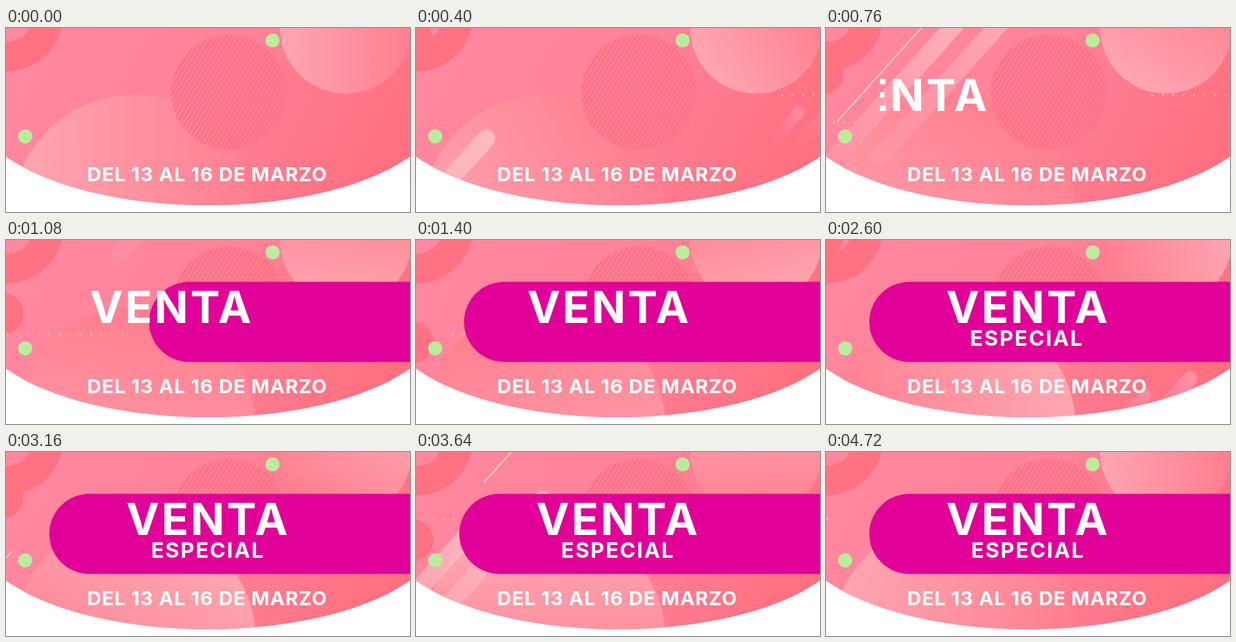
These frames come from a looping animation (600x275 px, 5.44 s). An HTML page with a canvas:

```html
<!DOCTYPE html>
<html lang="es">
<head>
<meta charset="utf-8">
<title>Venta especial</title>
<style>
  html, body { margin: 0; width: 100%; height: 100%; overflow: hidden; background: #fff; }
  canvas { display: block; }
</style>
</head>
<body>
<canvas id="stage" width="600" height="275"></canvas>
<script>
const ctx = document.getElementById('stage').getContext('2d');
const LOOP = 5440, STEP = 40, MOTION_END = 4720, SPIN = 4800;
const CORAL = '#ff7283', GREEN = '#b9ed9b', MAGENTA = '#e10098';
const DIR = { x: 0.666, y: -0.746 };

function gradient(x0, y0, x1, y1, ...colors) {
  const g = ctx.createLinearGradient(x0, y0, x1, y1);
  colors.forEach((c, i) => g.addColorStop(i / (colors.length - 1), c));
  return g;
}

function disc(x, y, r, fill) {
  ctx.beginPath();
  ctx.arc(x, y, r, 0, Math.PI * 2);
  ctx.fillStyle = fill;
  ctx.fill();
}

// A disc whose light side starts at the left and turns counterclockwise.
function spinningDisc(x, y, r, t) {
  const a = Math.PI - t / SPIN * Math.PI * 2;
  const dx = r * Math.cos(a), dy = r * Math.sin(a);
  disc(x, y, r, gradient(x + dx, y + dy, x - dx, y - dy, '#ffa6b2', '#ff7e8e'));
}

function stripedDisc(x, y, r) {
  ctx.save();
  ctx.beginPath();
  ctx.arc(x, y, r, 0, Math.PI * 2);
  ctx.clip();
  ctx.translate(x, y);
  ctx.rotate(0.56);
  ctx.fillStyle = '#ff7184';
  for (let i = -r - 3; i < r; i += 5.74) ctx.fillRect(i, -r, 3.2, r * 2);
  ctx.restore();
}

// A stroke along DIR; "tail" is measured from where its axis meets y = 0 at topX.
function streak(topX, tail, length, width, headColor, tailColor) {
  const x0 = topX + DIR.x * tail, y0 = DIR.y * tail;
  const x1 = x0 + DIR.x * length, y1 = y0 + DIR.y * length;
  ctx.beginPath();
  ctx.moveTo(x0, y0);
  ctx.lineTo(x1, y1);
  ctx.lineCap = 'round';
  ctx.lineWidth = width;
  ctx.strokeStyle = gradient(x0, y0, x1, y1, tailColor, headColor);
  ctx.stroke();
}

function dots(headX, y, color) {
  for (let i = 0; i < 12; i++) disc(headX + i * 15.5, y, 1.6, color);
}

function drawBackdrop(t) {
  ctx.fillStyle = gradient(60, 0, 540, 250, '#ff879f', '#ff8298', '#ff7080');
  ctx.fillRect(0, 0, 600, 275);
  disc(0, -20, 85, CORAL);
  disc(0, -20, 41, '#ff879f');
  spinningDisc(505, 0, 98, t);
  spinningDisc(190, 281, 181, t);
  stripedDisc(331, 96, 86);
}

function drawMovers(t) {
  for (const start of [0, 2400]) {
    if (t >= start) disc(-5, -33 + (t - start) * 0.133, 31, CORAL);
  }
  for (const start of [0, 3100]) {
    const tail = -1002 + 0.9 * (t - start);
    for (const [x, lead] of [[187, 0], [252, 60]]) {
      streak(x, tail + lead, 360, 27, 'rgba(255,205,208,.65)', 'rgba(255,180,190,.15)');
    }
  }
  for (const start of [0, 2697]) {
    streak(141.5, -720 + 0.7 * (t - start), 195, 1.8, '#d3dfb2', '#d3dfb2');
  }
  for (const start of [0, 2400]) {
    const tail = -470 + 0.7 * (t - start);
    streak(726, tail - 36, 88, 22, 'rgba(255,150,178,.75)', 'rgba(255,140,165,.1)');
    streak(681, tail - 25, 45, 18, 'rgba(255,150,178,.6)', 'rgba(255,140,165,.1)');
  }
  dots(0.165 * t - 176, 141, '#ffb985');
  dots(610 - 0.165 * t, 100, '#ffbd9c');
}

function drawPill(t) {
  const p = Math.min(1, Math.max(0, (t - 812) / 769));
  if (p === 0) return;
  const left = 64.3 + 536 * (1 - p) ** 3;
  ctx.beginPath();
  ctx.roundRect(left, 62.5, 700, 119.8, 59.9);
  ctx.fillStyle = MAGENTA;
  ctx.fill();
}

function label(text, x, y, size, weight, spacing) {
  ctx.font = `${weight} ${size}px Inter, sans-serif`;
  ctx.letterSpacing = spacing + 'px';
  ctx.fillStyle = '#fff';
  ctx.fillText(text, x, y);
}

function slideOffset(t, start, distance) {
  const p = Math.min(1, Math.max(0, (t - start) / 2493));
  return -distance * (1 - p) ** 8;
}

function drawTitles(t) {
  ctx.save();
  ctx.beginPath();
  ctx.rect(80, 0, 520, 275);
  ctx.clip();
  label('VENTA', 178.5 + slideOffset(t, 568, 340), 124, 66, 700, 3.2);
  label('ESPECIAL', 215.5 + slideOffset(t, 1400, 305), 158, 31.5, 700, 2);
  ctx.restore();
}

function draw(t) {
  ctx.fillStyle = '#fff';
  ctx.fillRect(0, 0, 600, 275);
  ctx.save();
  ctx.beginPath();
  ctx.ellipse(300, 115, 350, 150, 0, 0, Math.PI * 2);
  ctx.rect(0, 0, 600, 115);
  ctx.clip();
  drawBackdrop(t);
  drawMovers(t);
  disc(396, 18.5, 10.5, GREEN);
  disc(28.5, 162, 10.5, GREEN);
  ctx.restore();
  drawPill(t);
  drawTitles(t);
  label('DEL 13 AL 16 DE MARZO', 120.5, 229, 29, 700, 0.95);
}

const began = performance.now();
function tick() {
  const t = (performance.now() - began) % LOOP;
  draw(Math.min(MOTION_END, Math.floor(t / STEP) * STEP));
  requestAnimationFrame(tick);
}
tick();
</script>
</body>
</html>
```
